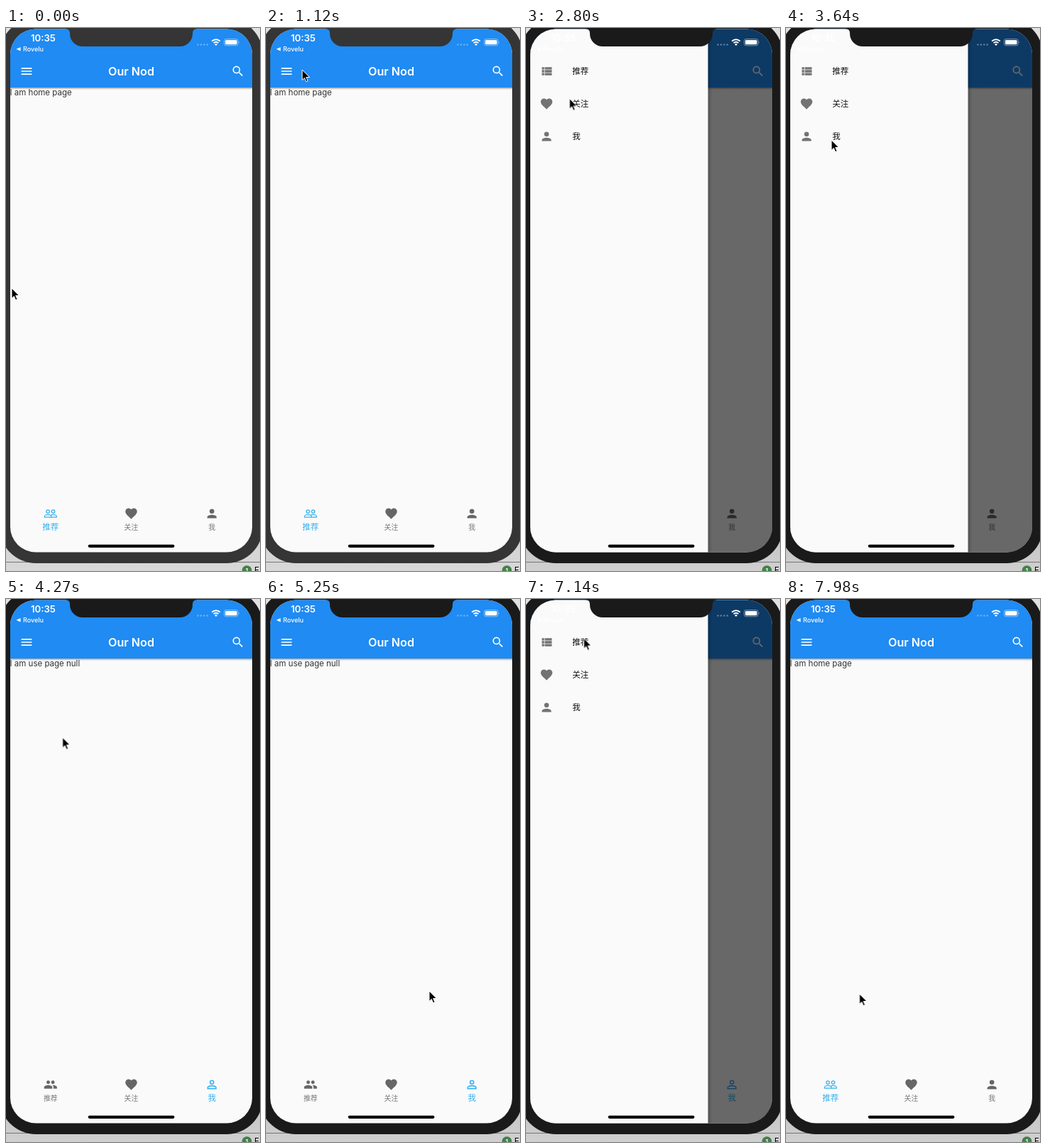
An HTML page for the animation above (8 s loop, 358 px wide and 766 px high).

```html
<!DOCTYPE html>
<html lang="zh">
<head>
<meta charset="utf-8">
<title>Drawer navigation</title>
<style>
  html, body { margin: 0; width: 100%; height: 100%; overflow: hidden; background: #dcdadb; }
  svg.stage { display: block; width: 100vw; height: 100vh; }
  text { font-family: Inter, "Noto Sans CJK SC", "Noto Sans CJK", sans-serif; }

  .phone { color: #353535; fill: currentColor; animation: focus 8s step-end infinite; }
  .shade { opacity: .5; animation: shade 8s step-end infinite; }
  .white { fill: #fff; }
  .title { font-size: 16.2px; font-weight: 600; text-anchor: middle; }
  .body { font-size: 11.5px; fill: #333; }
  .tab { fill: #666; font-size: 9.9px; text-anchor: middle; }
  .tab text { fill: #777; }
  .tab.on, .tab.on text { fill: #36b1ee; font-size: 11.5px; }
  .row { fill: #111; font-size: 11.5px; font-weight: 500; }
  .row use { fill: #737373; }

  .home { animation: home 8s step-end infinite; }
  .user { animation: user 8s step-end infinite; }
  .drawer { animation: drawer 8s infinite; }
  .scrim { animation: scrim 8s infinite; }
  .drawer, .scrim {
    animation-timing-function: linear(0, .31, .655, .85, .938, .976, 1);
  }
  .cursor { animation: cursor 8s infinite ease-in-out; }
  .ring { fill: none; stroke: #ee5a50; stroke-width: 2; animation: ring 8s step-end infinite; }

  @keyframes focus { 0% { color: #353535 } 22.6%, 100% { color: #1a1a1a } }
  @keyframes shade { 0% { opacity: .5 } 22.6%, 100% { opacity: 1 } }
  @keyframes home {
    0% { visibility: visible } 49.4% { visibility: hidden } 91.6%, 100% { visibility: visible }
  }
  @keyframes user {
    0% { visibility: hidden } 49.4% { visibility: visible } 91.6%, 100% { visibility: hidden }
  }
  @keyframes drawer {
    0%, 23.4%, 53.25%, 80.8%, 95.5%, 100% { transform: translateX(-251px); visibility: hidden }
    27.15%, 49.5%, 84.55%, 91.75% { transform: none; visibility: visible }
  }
  @keyframes scrim {
    0%, 23.4%, 53.25%, 80.8%, 95.5%, 100% { opacity: 0 }
    27.15%, 49.5%, 84.55%, 91.75% { opacity: .585 }
  }
  @keyframes cursor {
    0%, .9% { transform: translate(8px, 367px) }
    11.5% { transform: translate(50px, 64px) }
    14% { transform: translate(51px, 59px) }
    20.5%, 22.8% { transform: translate(25px, 65px) }
    25.4% { transform: translate(46.5px, 65px) }
    30% { transform: translate(62px, 69px) }
    38% { transform: translate(61px, 112px) }
    45.5%, 51% { transform: translate(64px, 158px) }
    62% { transform: translate(226px, 545px) }
    65.6%, 68.5% { transform: translate(230px, 553px) }
    78.5%, 80.8% { transform: translate(27px, 63px) }
    88%, 92.2% { transform: translate(81.5px, 55.5px) }
    99%, 100% { transform: translate(103.5px, 557px) }
  }
  @keyframes ring {
    0% { transform: translate(24.5px, 65px); opacity: 0 }
    22.5% { transform: translate(24.5px, 65px); opacity: .58 }
    26% { transform: translate(64px, 158px); opacity: 0 }
    48.9% { transform: translate(64px, 158px); opacity: .58 }
    52.4% { transform: translate(27px, 63px); opacity: 0 }
    80.2% { transform: translate(27px, 63px); opacity: .58 }
    83.7% { transform: translate(82px, 56px); opacity: 0 }
    91.3% { transform: translate(82px, 56px); opacity: .58 }
    94.8%, 100% { transform: translate(82px, 56px); opacity: 0 }
  }
</style>
</head>
<body>
<svg class="stage" viewBox="0 0 358 766">
  <defs>
    <!-- 24-unit icons, centred on the origin at stage scale -->
    <g id="menu" transform="scale(.8237) translate(-12 -12)"><path d="M3 18h18v-2H3zm0-5h18v-2H3zm0-7v2h18V6z"/></g>
    <g id="search" transform="scale(.8237) translate(-12 -12)"><path d="M15.5 14h-.79l-.28-.27A6.47 6.47 0 0 0 16 9.5 6.5 6.5 0 1 0 9.5 16c1.61 0 3.09-.59 4.23-1.57l.27.28v.79l5 4.99L20.49 19zm-6 0a4.5 4.5 0 1 1 0-9 4.5 4.5 0 0 1 0 9z"/></g>
    <g id="heart" transform="scale(.8237) translate(-12 -12)"><path d="M12 21.35l-1.45-1.32C5.4 15.36 2 12.28 2 8.5 2 5.42 4.42 3 7.5 3c1.74 0 3.41.81 4.5 2.09C13.09 3.81 14.76 3 16.5 3 19.58 3 22 5.42 22 8.5c0 3.78-3.4 6.86-8.55 11.54z"/></g>
    <g id="person" transform="scale(.8237) translate(-12 -12)"><circle cx="12" cy="8" r="4"/><path d="M12 14c-2.67 0-8 1.34-8 4v2h16v-2c0-2.66-5.33-4-8-4z"/></g>
    <g id="person-line" transform="scale(.8237) translate(-12 -12)" fill="none" stroke="#36b1ee" stroke-width="1.9">
      <circle cx="12" cy="8" r="3.05"/><path d="M12 13.95c-2.8 0-7.05 1.4-7.05 3.05v2.05h14.1V17c0-1.65-4.25-3.05-7.05-3.05z"/>
    </g>
    <g id="people" transform="scale(.8237) translate(-12 -12)"><circle cx="16" cy="8" r="3"/><circle cx="8" cy="8" r="3"/><path d="M8 13c-2.33 0-7 1.17-7 3.5V19h14v-2.5C15 14.17 10.33 13 8 13zm8 0c-.29 0-.62.02-.97.05 1.16.84 1.97 1.97 1.97 3.45V19h6v-2.5c0-2.33-4.67-3.5-7-3.5z"/></g>
    <g id="people-line" transform="scale(.8237) translate(-12 -12)" fill="none" stroke="#36b1ee" stroke-width="1.5">
      <circle cx="7.5" cy="8.5" r="2.75"/><circle cx="16.5" cy="8.5" r="2.75"/><path d="M7.5 13.75c-2 0-5.75 1-5.75 2.5v2h11.5v-2c0-1.5-3.75-2.5-5.75-2.5zM12.5 14.6c1.2-.5 2.8-.85 4-.85 2 0 5.75 1 5.75 2.5v2h-9"/>
    </g>
    <g id="list" transform="scale(.8237) translate(-12 -12)"><path d="M4 14h4v-4H4zm0 5h4v-4H4zM4 9h4V5H4zm5 5h12v-4H9zm0 5h12v-4H9zM9 5v4h12V5z"/></g>

    <clipPath id="screen"><rect x="6" y="1.5" width="341" height="738" rx="36"/></clipPath>
    <linearGradient id="edge"><stop stop-opacity=".2"/><stop offset="1" stop-opacity="0"/></linearGradient>
    <linearGradient id="under" x2="0" y2="1"><stop stop-opacity=".35"/><stop offset="1" stop-opacity="0"/></linearGradient>
    <linearGradient id="floor" x2="0" y2="1"><stop stop-color="#c6c6c6"/><stop offset="1" stop-color="#d0d0d0"/></linearGradient>
  </defs>

  <rect width="358" height="766" fill="#e3e0e2"/>
  <rect class="shade" y="725" width="358" height="41" fill="url(#floor)"/>
  <path d="M0 753.5h358" stroke="#777"/>
  <circle cx="339.5" cy="765" r="6.8" fill="#438048"/>
  <text x="339.5" y="768.5" font-size="9" font-weight="600" text-anchor="middle" class="white">1</text>
  <text x="350" y="769" font-size="11.5">F</text>

  <rect class="phone" x="-9" y="-13.5" width="371" height="768.5" rx="51"/>

  <g clip-path="url(#screen)">
    <rect width="358" height="766" fill="#fafafa"/>
    <rect x="6" y="84" width="341" height="3" fill="url(#under)"/>
    <rect width="358" height="84" fill="#1f8bf3"/>
    <g class="white">
      <use href="#menu" x="29" y="61"/>
      <text class="title" x="176.5" y="66.6">Our Nod</text>
      <use href="#search" x="326.9" y="61"/>
    </g>

    <g class="tab"><use href="#heart" x="176.5" y="685"/><text x="176.5" y="708.2">关注</text></g>
    <g class="home">
      <text class="body" x="5.5" y="94.7">I am home page</text>
      <g class="tab on"><use href="#people-line" x="62.8" y="685"/><text x="62.8" y="707.7">推荐</text></g>
      <g class="tab"><use href="#person" x="290.2" y="685"/><text x="290.2" y="708.2">我</text></g>
    </g>
    <g class="user">
      <text class="body" x="5.5" y="94.7">I am use page null</text>
      <g class="tab"><use href="#people" x="62.8" y="685"/><text x="62.8" y="708.2">推荐</text></g>
      <g class="tab on"><use href="#person-line" x="290.2" y="685"/><text x="290.2" y="707.7">我</text></g>
    </g>

    <rect class="scrim" width="358" height="766"/>
    <g class="drawer">
      <rect x="256.5" width="6" height="766" fill="url(#edge)"/>
      <rect x="6" width="250.5" height="766" fill="#fafafa"/>
      <g class="row"><use href="#list" x="29" y="61"/><text x="65.3" y="65.3">推荐</text></g>
      <g class="row"><use href="#heart" x="29" y="107"/><text x="65.3" y="111.3">关注</text></g>
      <g class="row"><use href="#person" x="29" y="153"/><text x="65.3" y="157.3">我</text></g>
    </g>

    <g class="white">
      <text x="35" y="18.8" font-size="13.2" font-weight="600">10:35</text>
      <path d="M14.5 29.8l6-2.8v5.6z"/>
      <text x="24" y="33" font-size="9" font-weight="500">Rovelu</text>
      <path d="M270.5 23.5h14" stroke="#fff" stroke-width="2.6" stroke-linecap="round" stroke-dasharray="0 4.4" opacity=".35"/>
      <path d="M290.2 18.6a8.2 8.2 0 0 1 11.6 0M292.6 21.1a4.8 4.8 0 0 1 6.8 0" fill="none" stroke="#fff" stroke-width="2"/>
      <path d="M296 25l-2-2.1a2.9 2.9 0 0 1 4 0z"/>
      <rect x="307.5" y="15.5" width="19.5" height="9.3" rx="2.6" fill="none" stroke="#fff" opacity=".45"/>
      <rect x="309" y="17" width="16.5" height="6.3" rx="1.4"/>
      <path d="M328.2 18.5q1.6 1.6 0 3.2z" opacity=".5"/>
    </g>
    <rect x="115.7" y="728.7" width="121.8" height="4.2" rx="2.1"/>
  </g>

  <path class="phone" d="M83 1q7 0 7 6v1a18 18 0 0 0 18 18h137a18 18 0 0 0 18-18v-1q0-6 7-6z"/>
  <circle class="ring" r="11.6"/>
  <path class="cursor" d="M0 0V14.5l3.3-3.1 2.3 5.3 2.4-1-2.3-5.2h4.7z" stroke="#fff" stroke-width="1"/>
</svg>
</body>
</html>
```
